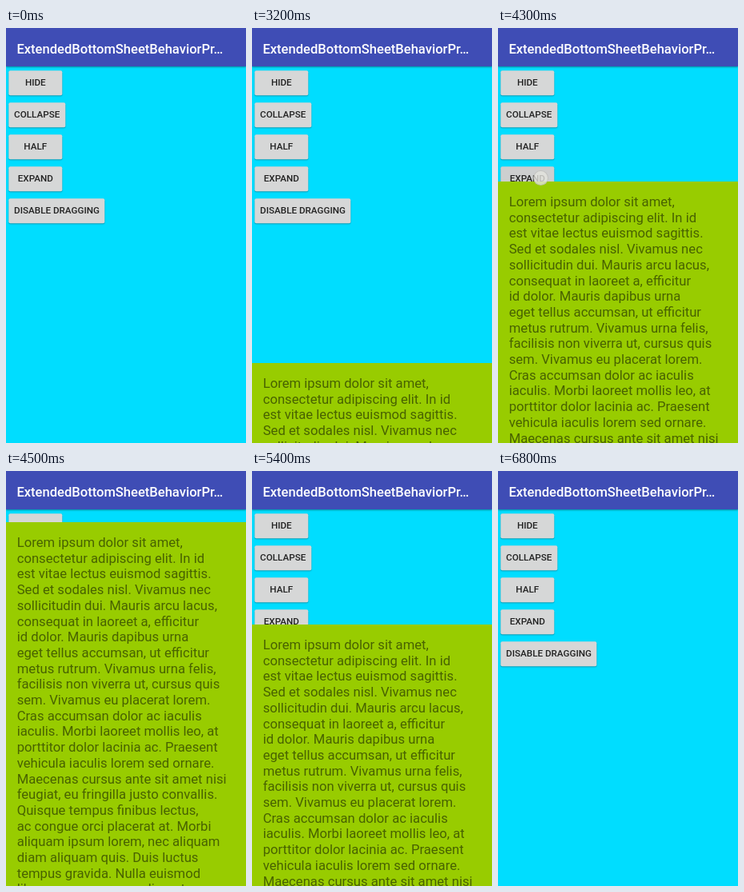
Recreate the animation shown at these times as an HTML page. Size 300 px wide and 519 px high, loop 6900 ms.

```html
<!DOCTYPE html>
<html lang="en">
<head>
<meta charset="utf-8">
<title>Bottom sheet</title>
<style>
html, body { margin: 0; width: 100%; height: 100%; overflow: hidden; background: #00ddff; }
body { position: relative; font-family: Roboto, sans-serif; }
header {
  position: absolute; z-index: 2; left: 0; top: 0; width: 100%; height: 48px;
  box-sizing: border-box; padding-left: 13.4px; background: #3f4db5; color: #fff;
  font: 500 16.57px/53px Roboto, sans-serif; white-space: nowrap;
  box-shadow: 0 1px 2px rgba(0, 0, 0, .4);
}
.button {
  position: absolute; left: 3px; height: 30.5px; min-width: 53.4px; padding: 0 6.8px;
  border-radius: 2px; background: #d6d7d7; color: #222;
  box-shadow: 0 1px 1.5px rgba(0, 0, 0, .3); transform: translate(.3px, .3px);
  font: 500 11.67px/31.5px Roboto, sans-serif; text-align: center; white-space: nowrap;
}
#sheet {
  position: absolute; z-index: 1; left: 0; top: 0; width: 100%; height: 471px;
  box-sizing: border-box; padding: 16px 0 0 13.7px; background: #98cc00; color: #486200;
  font-size: 16.67px; line-height: 19.7px; white-space: pre;
}
#touch {
  position: absolute; z-index: 3; left: -9.5px; top: -9.5px; width: 17px; height: 17px;
  border: 1px solid rgba(130, 130, 130, .3); border-radius: 50%;
  background: rgba(228, 228, 222, .8);
}
</style>
</head>
<body>
<header>ExtendedBottomSheetBehaviorPr…</header>
<div id="sheet">Lorem ipsum dolor sit amet,
consectetur adipiscing elit. In id
est vitae lectus euismod sagittis.
Sed et sodales nisl. Vivamus nec
sollicitudin dui. Mauris arcu lacus,
consequat in laoreet a, efficitur
id dolor. Mauris dapibus urna
eget tellus accumsan, ut efficitur
metus rutrum. Vivamus urna felis,
facilisis non viverra ut, cursus quis
sem. Vivamus eu placerat lorem.
Cras accumsan dolor ac iaculis
iaculis. Morbi laoreet mollis leo, at
porttitor dolor lacinia ac. Praesent
vehicula iaculis lorem sed ornare.
Maecenas cursus ante sit amet nisi
feugiat, eu fringilla justo convallis.
Quisque tempus finibus lectus,
ac congue orci placerat at. Morbi
aliquam ipsum lorem, nec aliquam
diam aliquam quis. Duis luctus
tempus gravida. Nulla euismod
libero ac posuere condimentum.</div>
<div id="touch"></div>
<script>
const LOOP = 6900, STEP = 100;
const HIDDEN = 520, PEEK = 419, HALF = 192, FULL = 48, DROP = 159;
const sheet = document.getElementById('sheet');
const touch = document.getElementById('touch');

const buttons = ['HIDE', 'COLLAPSE', 'HALF', 'EXPAND', 'DISABLE DRAGGING'].map((label, i) => {
  const b = document.createElement('div');
  b.className = 'button';
  b.textContent = label;
  b.style.top = 53 + 40 * i + 'px';
  document.body.append(b);
  return b;
});

const clamp = x => Math.max(0, Math.min(1, x));
const settle = x => 1 - (1 - x) ** 5;
const linear = x => x;

// start, duration, from, to, easing
const moves = [
  [2680, 320, HIDDEN, PEEK, settle],
  [3585, 375, PEEK, HALF, settle],
  [4380, 340, HALF, FULL, settle],
  [4900, 250, FULL, DROP, linear],
  [5150, 250, DROP, HALF, settle],
  [5780, 430, HALF, HIDDEN, settle]
];

// down, up, x, y, pressed button
const touches = [
  [2600, 2680, 43, 109, 1],
  [3500, 3640, 42, 149, 2],
  [4200, 4360, 53, 187, 3],
  [4800, 5150, 86.5, 163],
  [5700, 5800, 44, 69, 0]
];
const FADE = 110;

function sheetTop(t) {
  let y = HIDDEN;
  for (const [start, time, from, to, ease] of moves)
    if (t >= start) y = from + (to - from) * ease(clamp((t - start) / time));
  return Math.round(y);
}

function draw() {
  const elapsed = (performance.now() - begin) % LOOP;
  const t = Math.floor((elapsed + 1) / STEP) * STEP % LOOP;
  const top = sheetTop(t);
  sheet.style.transform = `translateY(${top}px)`;

  const active = touches.find(([down, up]) => t >= down && t < up + FADE);
  touch.style.opacity = active ? 1 - clamp((t - active[1]) / FADE) : 0;
  if (active) {
    const [, , x, y, pressed] = active;
    const drag = pressed === undefined ? Math.max(0, top - FULL) : 0;
    touch.style.transform = `translate(${x}px, ${y + drag}px)`;
  }
  buttons.forEach((b, i) => {
    const held = active && active[4] === i && t > active[0];
    b.style.background = held ? '#cdcfcf' : '#d6d7d7';
  });
  requestAnimationFrame(draw);
}

const begin = performance.now();
draw();
</script>
</body>
</html>
```
